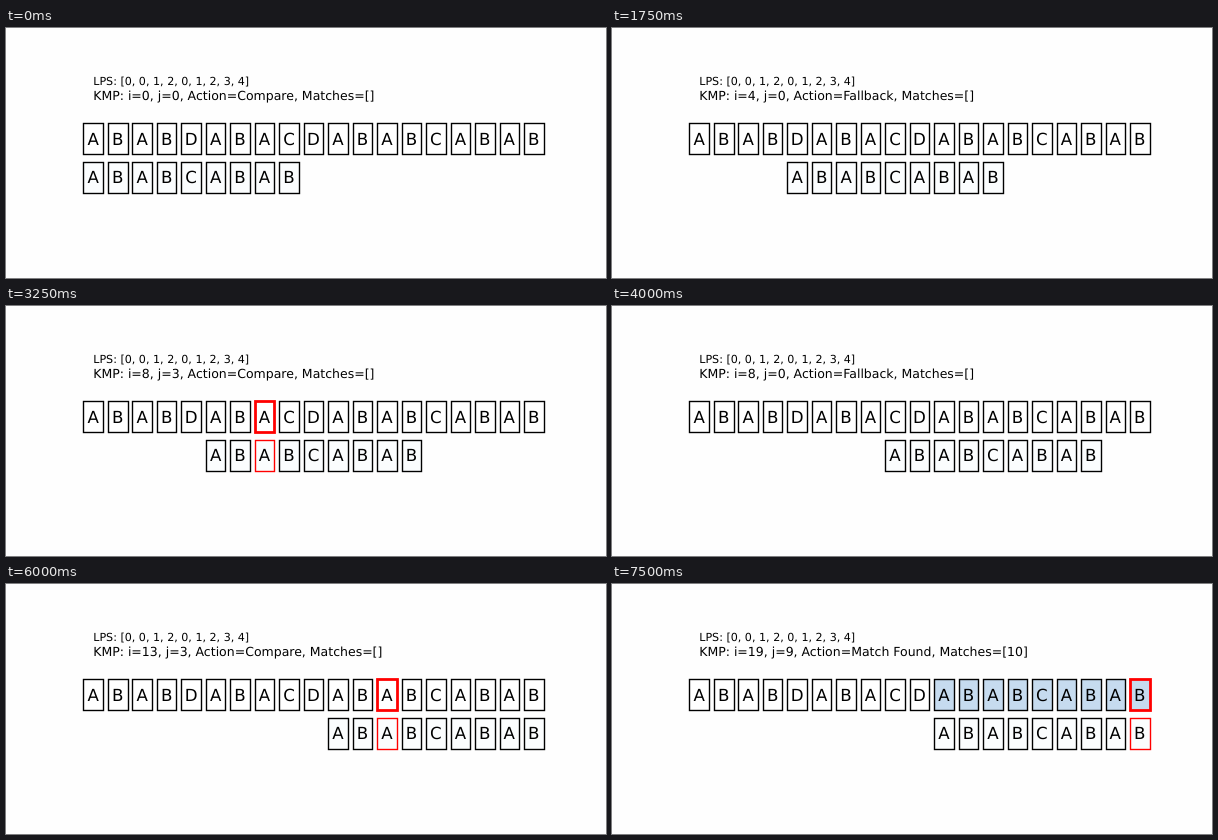
Write an HTML page that moves like this. It is 600x250 px and loops after 7750 ms.

```html
<!DOCTYPE html>
<html lang="en">
<head>
<meta charset="utf-8">
<title>KMP search</title>
<style>
  html, body { margin: 0; width: 100%; height: 100%; overflow: hidden; background: #fefefe; }
  svg { display: block; width: 600px; height: 250px; }
  text { font-family: "DejaVu Sans", sans-serif; white-space: pre; text-rendering: geometricPrecision; }
  rect { fill: #fff; stroke: #000; stroke-width: 1.39px; }
  .cell { font-size: 16.67px; text-anchor: middle; }
  .pattern rect { fill: #fbfdfe; }
  .hit rect { stroke: #f00; }
  .text .hit rect { stroke-width: 2.78px; }
  .found rect { fill: #c6dbef; }
</style>
</head>
<body>
<svg viewBox="0 0 600 250">
  <text id="lps" x="87.2" y="57" font-size="11.11"></text>
  <text id="status" x="87.2" y="72" font-size="12.5"></text>
</svg>
<script>
const TEXT = "ABABDABACDABABCABAB";
const PATTERN = "ABABCABAB";
const STEP = 250;
const LEFT = 87.24, PITCH = 465 / 19;
const svg = document.querySelector("svg");
const statusLine = document.getElementById("status");

function prefixTable(p) {
  const table = [0];
  for (let i = 1, len = 0; i < p.length; i++) {
    while (len && p[i] !== p[len]) len = table[len - 1];
    if (p[i] === p[len]) len++;
    table.push(len);
  }
  return table;
}

function search(text, p, lps) {
  const steps = [], matches = [];
  let i = 0, j = 0;
  const log = action => steps.push({ i, j, action, matches: [...matches] });
  while (i < text.length) {
    log("Compare");
    if (text[i] === p[j]) {
      i++; j++;
      if (j === p.length) {
        matches.push(i - j);
        log("Match Found");
        j = lps[j - 1];
      }
    } else if (j) {
      j = lps[j - 1];
      log("Fallback");
    } else {
      i++;
      log("Advance");
    }
  }
  return steps;
}

function add(parent, tag, attrs) {
  const el = document.createElementNS("http://www.w3.org/2000/svg", tag);
  for (const key in attrs) el.setAttribute(key, attrs[key]);
  return parent.appendChild(el);
}

// Box edges sit on pixel centres so the thin strokes stay crisp.
const snap = x => Math.round(x) + 0.5;

function place(cell, col) {
  const x = LEFT + col * PITCH, half = PITCH * 0.4;
  const [box, label] = cell.children;
  box.setAttribute("x", snap(x - half));
  box.setAttribute("width", snap(x + half) - snap(x - half));
  label.setAttribute("x", x);
}

function makeRow(name, letters, top, baseline) {
  const row = add(svg, "g", { class: name });
  return [...letters].map((ch, k) => {
    const cell = add(row, "g", {});
    add(cell, "rect", { y: top, height: 31 });
    add(cell, "text", { class: "cell", y: baseline }).textContent = ch;
    place(cell, k);
    return cell;
  });
}

const lps = prefixTable(PATTERN);
const steps = search(TEXT, PATTERN, lps);
const textCells = makeRow("text", TEXT, 95.5, 117);
const patternCells = makeRow("pattern", PATTERN, 134.5, 155);
document.getElementById("lps").textContent = `LPS: [${lps.join(", ")}]`;

function show({ i, j, action, matches }) {
  statusLine.textContent = `KMP: i=${i}, j=${j}, Action=${action}, Matches=[${matches.join(", ")}]`;
  textCells.forEach((cell, k) => {
    cell.classList.toggle("hit", j > 0 && k === i - 1);
    cell.classList.toggle("found", matches.some(m => k >= m && k < m + PATTERN.length));
  });
  patternCells.forEach((cell, k) => {
    place(cell, i - j + k);
    cell.classList.toggle("hit", k === j - 1);
  });
}

const start = performance.now();
let shown = -1;
function tick() {
  const n = Math.floor((performance.now() - start) / STEP) % steps.length;
  if (n !== shown) show(steps[shown = n]);
  requestAnimationFrame(tick);
}
tick();
</script>
</body>
</html>
```
